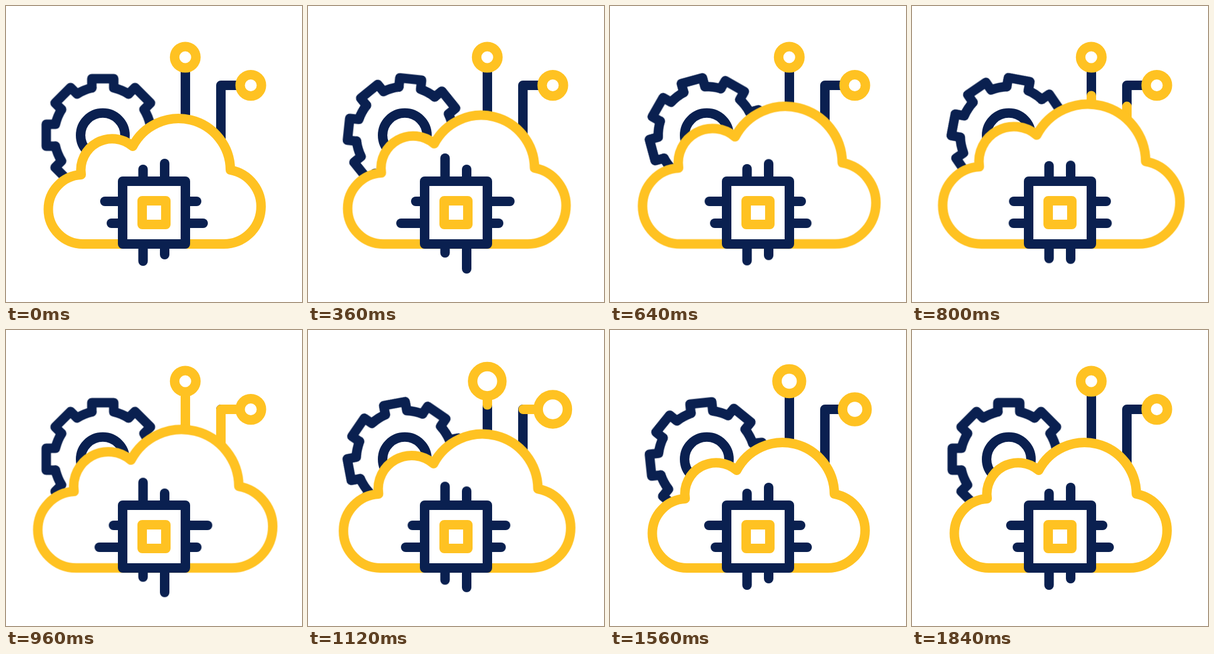
Write an HTML page that moves like this. It is 500 px wide and 500 px high and loops after 2000 ms.

```html
<!DOCTYPE html>
<html lang="en">
<head>
<meta charset="utf-8">
<title>Cloud computing</title>
<style>
  @property --head { syntax: "<length>"; inherits: false; initial-value: 0px; }
  @property --tail { syntax: "<length>"; inherits: false; initial-value: 0px; }

  :root {
    --navy: #0a2050;
    --gold: #ffc222;
    --ease: cubic-bezier(.333, 0, .667, 1);
  }
  html, body { margin: 0; width: 100%; height: 100%; overflow: hidden; background: #fff; }
  svg {
    display: block; width: 100%; height: 100%;
    fill: none; stroke-width: 16; stroke-linecap: round; stroke-linejoin: round;
  }
  .navy { stroke: var(--navy); }
  .gold { stroke: var(--gold); }
  .solid { fill: #fff; }

  .wheel, .cloud, .pins line, .ring, .pulse {
    animation: 2s var(--ease) infinite paused;
  }
  .wheel { animation-name: turn; }
  .cloud { animation-name: swell; transform-origin: 242.4px 402px; vector-effect: non-scaling-stroke; }
  .pins line { animation-name: slide; }
  .ring { animation-name: grow; }
  .pulse {
    animation-name: head, tail;
    stroke-dasharray: calc(var(--head) - var(--tail)) 900px;
    stroke-dashoffset: calc(var(--tail) * -1);
  }

  @keyframes turn {
    0%, 4% { transform: rotate(0deg); animation-timing-function: cubic-bezier(.55, 0, .45, 1); }
    92%, 100% { transform: rotate(180deg); }
  }
  @keyframes swell {
    0%, 8%, 74%, 100% { transform: scale(1); }
    40%, 42% { transform: scale(1.115); }
  }
  @keyframes slide {
    0%, 3%, 34.25%, 65%, 100% { transform: translate(0px, 0px); }
    18.25%, 49.5% { transform: translate(var(--x, 0px), var(--y, 0px)); }
  }
  @keyframes grow {
    0%, 48%, 84%, 100% { r: 18px; }
    61%, 66.5% { r: 28px; }
  }
  @keyframes head {
    0%, 31.6% { --head: 0px; }
    49.1%, 100% { --head: 100px; }
  }
  @keyframes tail {
    0%, 45% { --tail: 0px; }
    61.3%, 100% { --tail: 100px; }
  }
</style>
</head>
<body>
<svg viewBox="0 0 500 500">
  <defs>
    <path id="tooth" d="M-18.5 -80V-95.5H18.5V-80A82 82 0 0 1 43.5 -69.6"/>
    <path id="wire1" pathLength="100" d="M303 193V104.5"/>
    <path id="wire2" pathLength="100" d="M363 230V134H395.5"/>
  </defs>

  <g class="navy" transform="translate(163.5 218.3)">
    <circle r="37.5"/>
    <g class="wheel">
      <use href="#tooth"/>
      <use href="#tooth" transform="rotate(45)"/>
      <use href="#tooth" transform="rotate(90)"/>
      <use href="#tooth" transform="rotate(135)"/>
      <use href="#tooth" transform="rotate(180)"/>
      <use href="#tooth" transform="rotate(225)"/>
      <use href="#tooth" transform="rotate(270)"/>
      <use href="#tooth" transform="rotate(315)"/>
    </g>
  </g>

  <g class="navy">
    <use href="#wire1"/>
    <use href="#wire2"/>
  </g>
  <g class="gold">
    <use class="pulse" href="#wire1"/>
    <use class="pulse" href="#wire2"/>
    <circle class="ring solid" cx="302.8" cy="86.5" r="18"/>
    <circle class="ring solid" cx="413.5" cy="134" r="18"/>
    <path class="cloud solid" d="M130 402A58.5 58.5 0 0 1 71.5 343.5A58.5 58.5 0 0 1 127 285A53 53 0 0 1 214 237A87.5 87.5 0 0 1 379 277A63 63 0 0 1 368 402Z"/>
  </g>

  <g class="navy pins">
    <line x1="231.5" y1="276" x2="231.5" y2="320" style="--y: -19px"/>
    <line x1="268" y1="266" x2="268" y2="320" style="--y: 10px"/>
    <line x1="167" y1="330" x2="220" y2="330" style="--x: 15px"/>
    <line x1="178" y1="367" x2="220" y2="367" style="--x: -21px"/>
    <line x1="322" y1="330" x2="280" y2="330" style="--x: 19px"/>
    <line x1="333" y1="367" x2="280" y2="367" style="--x: -11px"/>
    <line x1="231.5" y1="431" x2="231.5" y2="380" style="--y: -14px"/>
    <line x1="268" y1="420" x2="268" y2="380" style="--y: 24px"/>
  </g>
  <rect class="navy solid" x="197" y="296" width="106" height="106"/>
  <rect class="gold" x="230" y="329" width="40" height="40"/>
</svg>
<script>
  // Advance the paused keyframes in 40 ms steps.
  const STEP = 40, LOOP = 2000;
  const start = performance.now();
  const parts = document.getAnimations();

  function tick() {
    const time = (performance.now() - start + 2) % LOOP;
    const stepped = Math.floor(time / STEP) * STEP;
    for (const part of parts) part.currentTime = stepped;
    requestAnimationFrame(tick);
  }
  tick();
</script>
</body>
</html>
```
